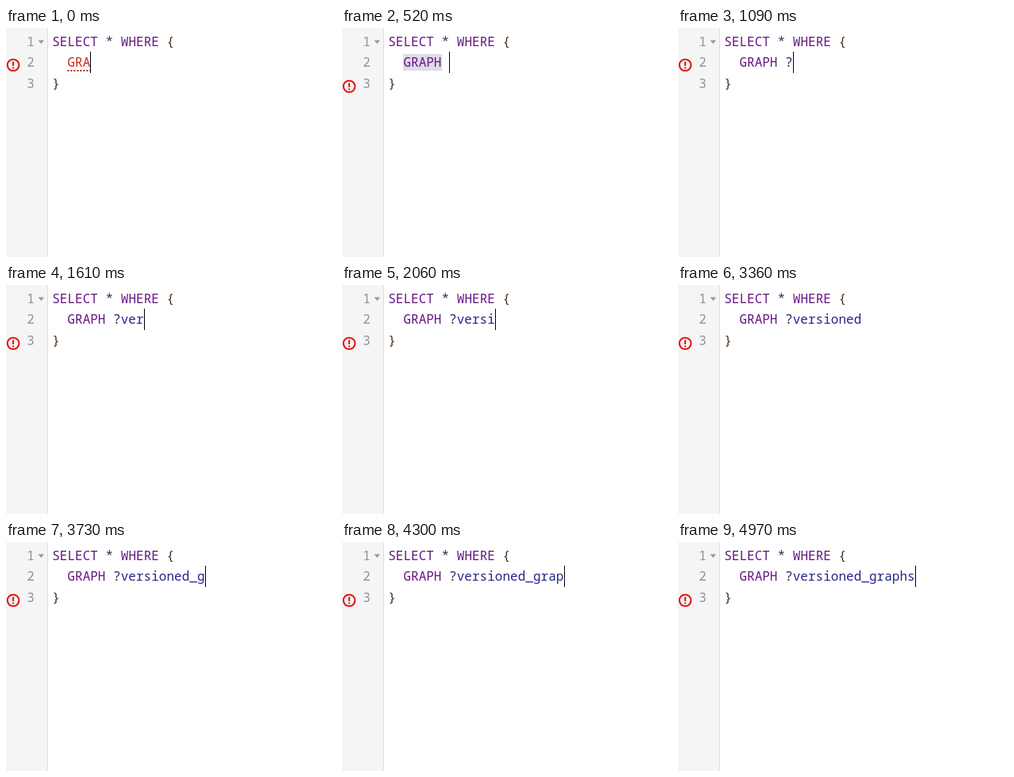
Write an HTML page that moves like this. It is 416x290 px and loops after 5000 ms.

```html
<!DOCTYPE html>
<html lang="en">
<head>
<meta charset="utf-8">
<title>Typing a SPARQL query</title>
<style>
  html, body { margin: 0; width: 100%; height: 100%; overflow: hidden; background: #fff; }
  svg { display: block; }
  text { font: 16.04px "Noto Sans Mono", "DejaVu Sans Mono", monospace; white-space: pre; fill: #47260c; }
  .num { fill: #929292; }
  .key { fill: #641680; }
  .star { fill: #22345c; }
  .sigil { fill: #3c1a62; }
  .var { fill: #24248c; }
  .bad { fill: #cc2a1c; }
</style>
</head>
<body>
<svg width="416" height="290" viewBox="0 0 416 290">
  <rect width="52" height="290" fill="#f5f5f5"/>
  <rect x="52" width="1" height="290" fill="#ddd"/>
  <path d="M40.5 15.5h7.5l-3.75 4.5z" fill="#999"/>
  <g id="icon" fill="none" stroke="#df1b17" stroke-width="2.1">
    <circle r="7.3"/>
    <path d="M0-4.6V1M0 2.4V4.6"/>
  </g>
  <text class="num" x="26.3" y="23">1</text>
  <text class="num" x="26.3" y="49">2</text>
  <text class="num" x="26.3" y="76">3</text>
  <rect id="mark" x="77" y="33" width="49" height="21" fill="#dfdbe7"/>
  <text x="58.2" y="23"><tspan class="key">SELECT</tspan> <tspan class="star">*</tspan> <tspan class="key">WHERE</tspan> {</text>
  <text x="77.4" y="49"><tspan id="word"></tspan><tspan id="sigil" class="sigil"></tspan><tspan id="name" class="var"></tspan></text>
  <text x="58.2" y="76">}</text>
  <path id="wave" stroke="#b3201c" stroke-width="2" stroke-dasharray="2 2"/>
  <rect id="caret" y="30" width="1" height="27" fill="#000"/>
</svg>
<script>
const LOOP = 5000, BLINK = 530, CELL = 9.625, LEFT = 77.4;
const line = "GRAPH ?versioned_graphs";
// When each character after "GRA" is typed.
const keys = [
  120, 220, 430, 850,
  1170, 1300, 1480, 1720, 1860, 2090, 2200, 2330, 2510,
  3370, 3560, 3910, 3990, 4190, 4330, 4480
];
const $ = id => document.getElementById(id);
const show = (el, on) => el.setAttribute("visibility", on ? "visible" : "hidden");

function draw(t) {
  const typed = keys.filter(k => k <= t).length;
  const count = 3 + typed;
  const text = line.slice(0, count);
  const broken = count < 5;
  const end = LEFT + count * CELL;

  $("word").textContent = text.slice(0, 6);
  $("word").setAttribute("class", broken ? "bad" : "key");
  $("sigil").textContent = text.slice(6, 7);
  $("name").textContent = text.slice(7);

  $("wave").setAttribute("d", `M${LEFT} 54H${end}`);
  show($("wave"), broken);
  show($("mark"), t >= 330 && t < 600);

  const row = broken || count === 7 ? 47 : 74;
  $("icon").setAttribute("transform", `translate(9.1 ${row})`);

  const last = typed ? keys[typed - 1] : 0;
  $("caret").setAttribute("x", Math.round(end));
  show($("caret"), Math.floor((t - last) / BLINK) % 2 === 0);
}

const start = performance.now();
function tick() {
  draw((performance.now() - start) % LOOP);
  requestAnimationFrame(tick);
}
tick();
</script>
</body>
</html>
```
